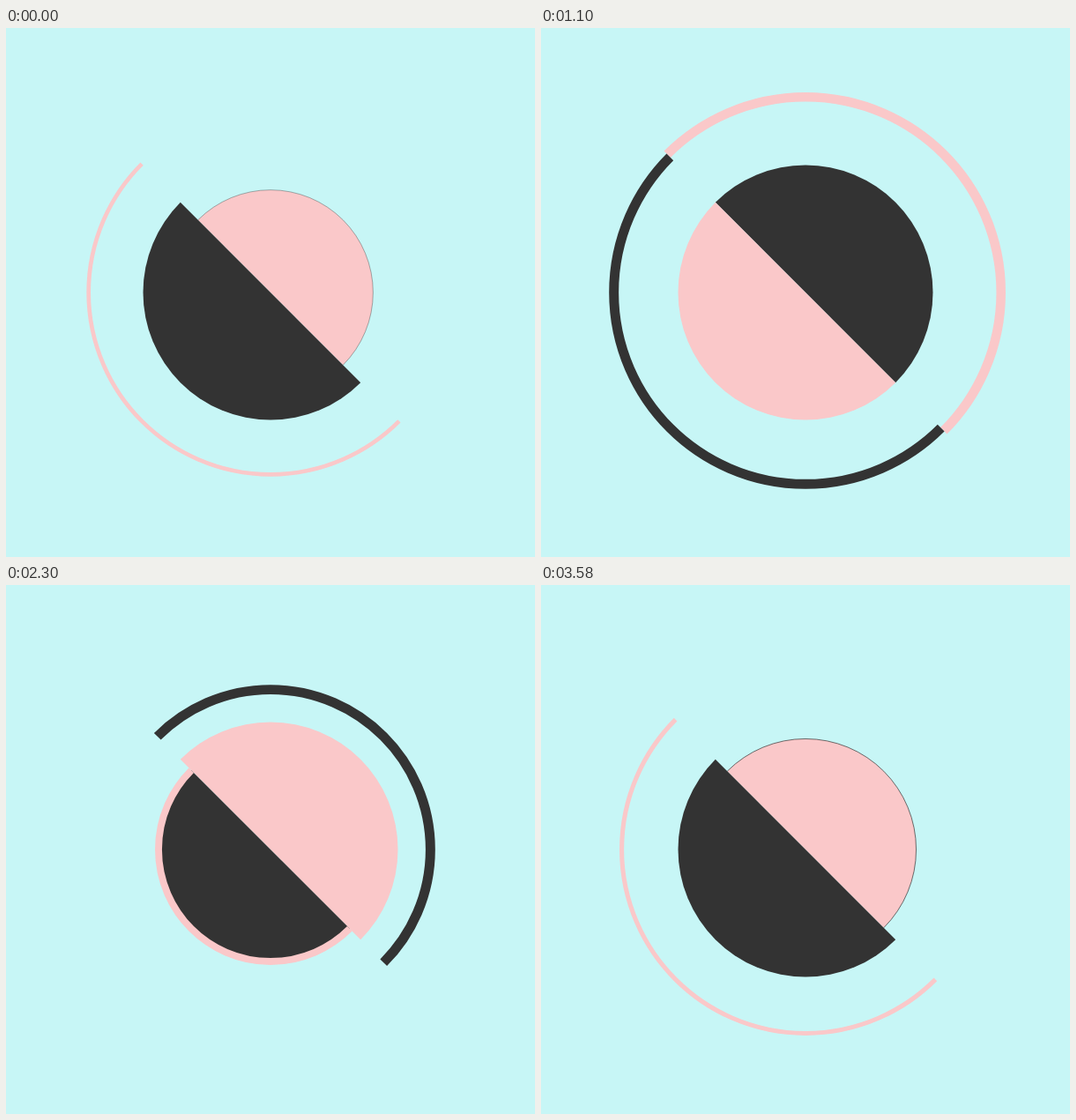
These frames come from a looping animation (600x600 px, 3600 ms). An HTML page with a canvas:

```html
<!DOCTYPE html>
<html lang="en">
<head>
<meta charset="utf-8">
<title>Half discs</title>
<style>
  html, body { margin: 0; width: 100%; height: 100%; overflow: hidden; background: #c7f6f6; }
  canvas { display: block; width: 600px; height: 600px; }
</style>
</head>
<body>
<canvas id="stage" width="600" height="600"></canvas>
<script>
const ctx = document.getElementById('stage').getContext('2d');
const BG = '#c7f6f6', PINK = '#fac8c9', DARK = '#333333';
const LOOP = 3600, HALF = LOOP / 2;
const DISC = 144.5, REACH = 222.5;

// Each burst grows from the centre, then collapses back into it.
const darkDisc = { disc: DARK, ring: PINK, from: 850, to: 2085, power: 5 };
const pinkDisc = { disc: PINK, ring: DARK, from: 1129, to: 1989, power: 3 };

// Ring thickness over the life of a burst: [ms, px]
const THICK = [[8, 1], [180, 5.8], [360, 9.6], [540, 11.3], [850, 11], [1250, 10.3],
  [1440, 8], [1500, 6.3], [1560, 5.1], [1760, 1], [1800, 0.4], [1820, 0]];

const clamp = x => Math.min(1, Math.max(0, x));
const progress = (t, a, b) => clamp((t - a) / (b - a));

function thickness(t) {
  const i = THICK.findIndex(k => k[0] > t);
  if (i < 0) return 0;
  if (i === 0) return THICK[0][1];
  const [t0, w0] = THICK[i - 1], [t1, w1] = THICK[i];
  return w0 + (w1 - w0) * (t - t0) / (t1 - t0);
}

function radius(t, burst) {
  const grow = 1 - (1 - progress(t, 8, 1440)) ** 4;
  const shrink = progress(t, burst.from, burst.to) ** burst.power;
  return REACH * (grow - shrink);
}

function drawBurst(t, burst, angle) {
  const r = radius(t, burst), w = Math.min(thickness(t), 2 * r);
  if (r <= 0) return;
  ctx.beginPath();
  ctx.arc(300, 300, Math.min(DISC, r), angle, angle + Math.PI);
  ctx.closePath();
  ctx.fillStyle = burst.disc;
  ctx.fill();
  if (w <= 0) return;
  ctx.beginPath();
  ctx.arc(300, 300, r, angle, angle + Math.PI);
  ctx.lineWidth = w;
  ctx.strokeStyle = burst.ring;
  ctx.stroke();
}

// The next burst covers the remains of the last one.
function drawHalf(time, angle) {
  const t = (time + LOOP) % LOOP;
  const [now, last] = t < HALF ? [darkDisc, pinkDisc] : [pinkDisc, darkDisc];
  drawBurst(t % HALF + HALF, last, angle);
  drawBurst(t % HALF, now, angle);
}

function draw(time) {
  ctx.fillStyle = BG;
  ctx.fillRect(0, 0, 600, 600);
  drawHalf(time, -Math.PI * 3 / 4);
  drawHalf(time - 2020, Math.PI / 4);
}

const start = performance.now();
function tick() {
  draw((performance.now() - start) % LOOP);
  requestAnimationFrame(tick);
}
tick();
</script>
</body>
</html>
```
